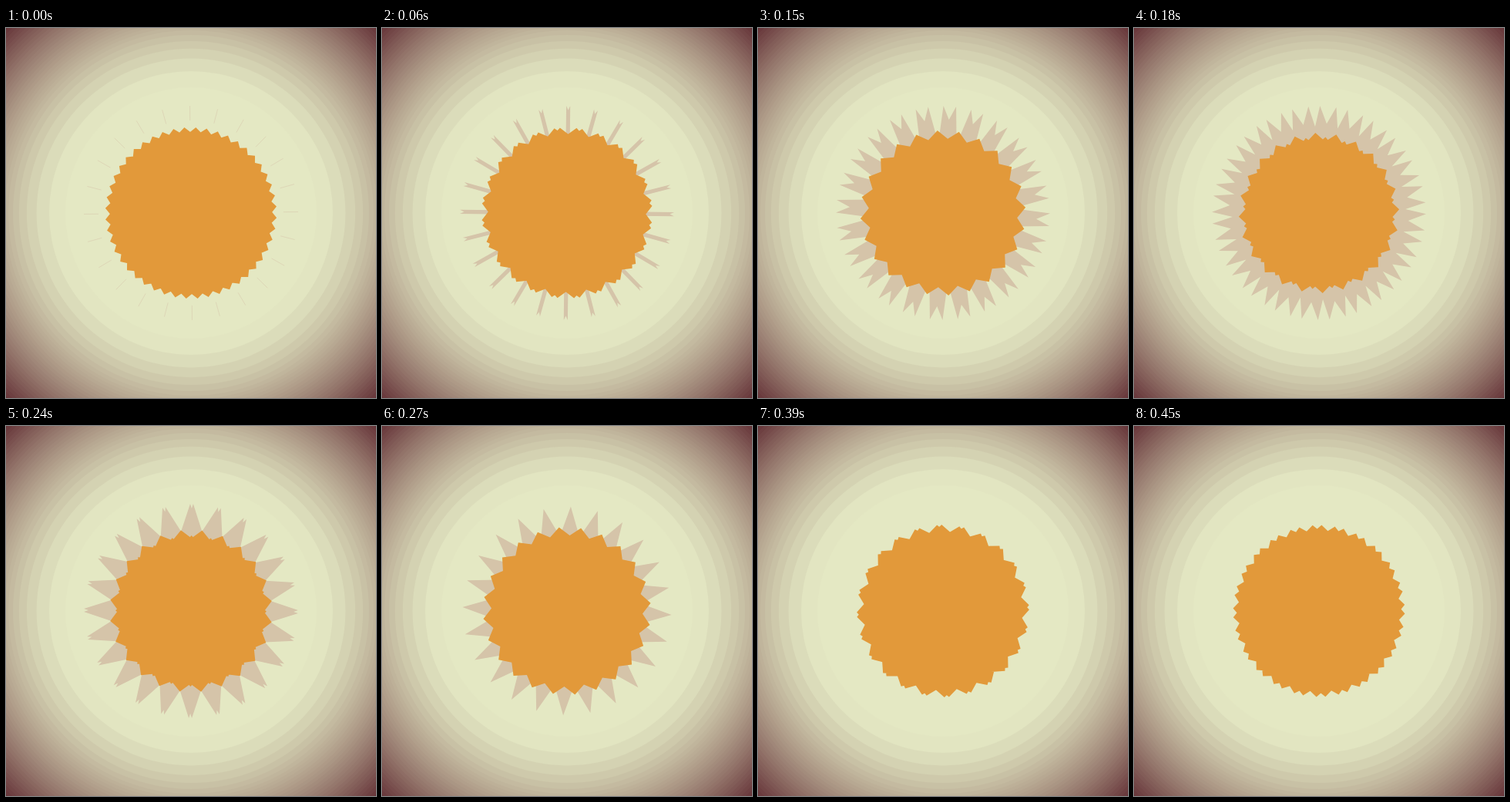
Animation, 480 px wide and 480 px high, one loop 0.48 s. Source, as an HTML page:

```html
<!DOCTYPE html>
<html lang="en">
<head>
<meta charset="utf-8">
<title>Turning sun</title>
<style>
html, body { margin: 0; width: 100%; height: 100%; overflow: hidden; background: #653338; }
svg { display: block; width: 100vw; height: 100vh; }
</style>
</head>
<body>
<svg viewBox="0 0 480 480">
  <g id="glow"></g>
  <path id="rays" fill="#d5c4a9"/>
  <path id="seams" fill="none" stroke="#d5c4a9" stroke-width="1" opacity=".5"/>
  <path id="disc" fill="#e2993a"/>
</svg>
<script>
const STEP = 30, STEPS = 16, SECTOR = 15, HALF = 7.5;
const RIM = 139, TOOTH = 11;
const MEET = 4, SPLIT = 10;   // steps where the teeth merge and part
const CREAM = [228, 232, 195], DARK = [101, 51, 56];
const $ = id => document.getElementById(id);
const clamp = x => Math.min(1, Math.max(0, x));
const smooth = x => x * x * (3 - 2 * x);

function point(deg, r) {
  const a = deg * Math.PI / 180;
  return (240 + r * Math.sin(a)).toFixed(2) + ' ' + (240 - r * Math.cos(a)).toFixed(2);
}

// Repeats one sector of [angle, radius] points around the centre.
function ring(sector, turn) {
  const pts = [];
  for (let s = 0; s < 360; s += SECTOR)
    for (const [a, r] of sector) pts.push(point(turn + s + a, r));
  return 'M' + pts.join('L') + 'Z';
}

const star = (turn, tip) => ring([[0, tip], [HALF, tip - TOOTH]], turn);

function seamPath(turn) {
  let d = '';
  for (let s = 0; s < 360; s += SECTOR)
    d += 'M' + point(turn + s, 120) + 'L' + point(turn + s, RIM);
  return d;
}

function paintGlow() {
  let circles = '';
  for (let r = 163, gap = 21; r < 345; gap = Math.max(4, gap * 0.78)) {
    const k = clamp((r + gap / 2 - 163) / 177) ** 1.5;
    const rgb = CREAM.map((c, i) => Math.round(c + (DARK[i] - c) * k));
    r += gap;
    circles = `<circle cx="240" cy="240" r="${r}" fill="rgb(${rgb})"/>` + circles;
  }
  $('glow').innerHTML = circles +
    `<circle cx="240" cy="240" r="163" fill="rgb(${CREAM})"/>`;
}

const turnAt = n => -0.6 + 0.5 * n + 0.07 * n * n;

// Outer notches grow inwards while the inner ones close towards the rim.
function rayPath(n) {
  const notch = RIM - 2.2 * n - 0.27 * n * n;
  const spread = (RIM - notch) * 0.465 / RIM * 180 / Math.PI;
  const inner = 133 * smooth(clamp(n / 8));
  const sector = spread < HALF
    ? [[0, notch], [spread, RIM], [HALF, inner], [SECTOR - spread, RIM]]
    : [[0, notch], [HALF, Math.min(RIM, notch * 1.394)]];
  return ring(sector, turnAt(n));
}

// Between merging and parting, a new star outgrows the old one;
// afterwards it parts into a slow and a fast star.
function discPath(n) {
  if (n >= MEET && n < SPLIT) {
    const k = n - MEET, turn = turnAt(n);
    return star(turn, 92 + 3.4 * k) + star(turn + HALF, 110.5 - 3.15 * k);
  }
  const k = (n - SPLIT + STEPS) % STEPS / 10;
  const start = turnAt(SPLIT), tip = 112.5 - 2 * k;
  return star(start - 1.4 * k, tip) + star(start + 13.6 * k ** 1.35, tip);
}

function draw(n) {
  $('rays').setAttribute('d', n ? rayPath(n) : '');
  $('seams').setAttribute('d', n ? '' : seamPath(turnAt(0)));
  $('disc').setAttribute('d', discPath(n));
}

let last = -1;
const start = performance.now();
function tick(now) {
  const n = Math.floor(Math.max(0, now - start) / STEP) % STEPS;
  if (n !== last) draw(last = n);
  requestAnimationFrame(tick);
}

paintGlow();
draw(0);
requestAnimationFrame(tick);
</script>
</body>
</html>
```
